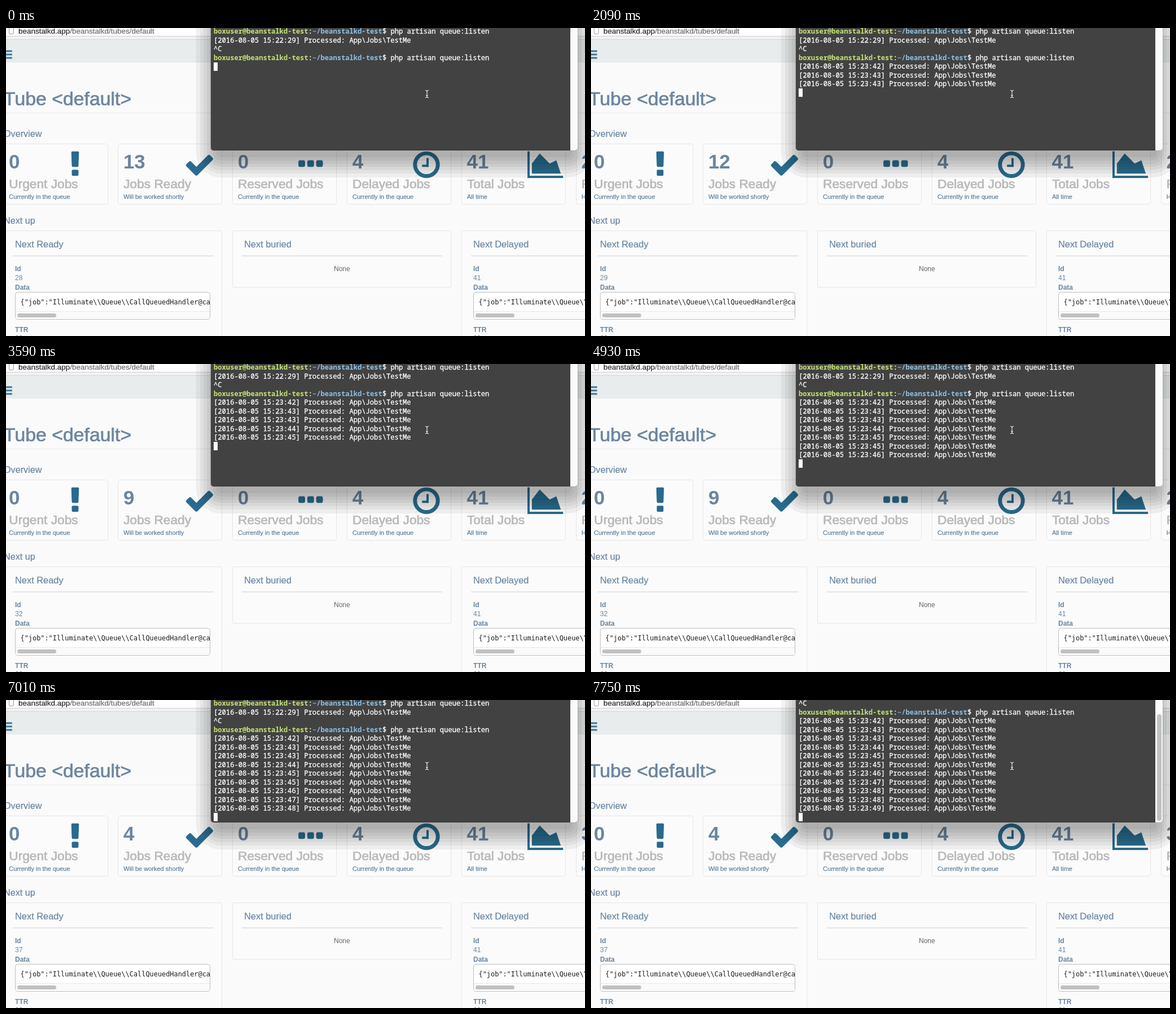
An HTML page with a canvas for the animation above (8000 ms loop, 1026 px wide and 546 px high).

```html
<!DOCTYPE html>
<html lang="en">
<head>
<meta charset="utf-8">
<title>Queue dashboard</title>
<style>
html, body { margin: 0; width: 100%; height: 100%; overflow: hidden; background: #fafafa; }
canvas { display: block; width: 1026px; height: 546px; }
</style>
</head>
<body>
<canvas id="stage" width="1026" height="546"></canvas>
<script>
const ctx = document.getElementById('stage').getContext('2d', { alpha: false });
const LOOP = 8000;
const SANS = '"Liberation Sans", Arial, sans-serif';
const CODE = '"DejaVu Sans Mono", monospace';
const TERM = '"Noto Sans Mono", "DejaVu Sans Mono", monospace';
const BLUE = '#6b859f', ICON = '#296b8e', EDGE = '#e6e6e6';

// Start time and clock second of each finished job
const jobs = [
  [590, 42], [1340, 43], [2090, 43], [2840, 44], [3590, 45], [4180, 45],
  [4930, 46], [5670, 47], [6420, 48], [7160, 48], [7750, 49]
];

// Dashboard polls: time, ready jobs, next id, last counter
const polls = [
  [0, 13, 28, 28], [1340, 12, 29, 29], [2990, 9, 32, 29],
  [5380, 6, 35, 31], [7010, 4, 37, 33]
];

function rect(x, y, w, h, color) {
  ctx.fillStyle = color;
  ctx.fillRect(x, y, w, h);
}

function box(x, y, w, h, r, fill, stroke) {
  ctx.beginPath();
  ctx.roundRect(x, y, w, h, r);
  if (fill) { ctx.fillStyle = fill; ctx.fill(); }
  if (stroke) { ctx.strokeStyle = stroke; ctx.lineWidth = 1; ctx.stroke(); }
}

// Polygon whose corners are rounded by growing it outwards by r
function poly(points, color, r = 0) {
  ctx.beginPath();
  points.forEach(([x, y]) => ctx.lineTo(x, y));
  ctx.closePath();
  ctx.fillStyle = color;
  ctx.fill();
  if (r) {
    ctx.strokeStyle = color;
    ctx.lineWidth = 2 * r;
    ctx.stroke();
  }
}

function text(s, x, y, font, color, weight = 0) {
  ctx.font = font;
  ctx.fillStyle = color;
  ctx.fillText(s, x, y);
  if (weight) {
    ctx.strokeStyle = color;
    ctx.lineWidth = weight;
    ctx.strokeText(s, x, y);
  }
}

const sans = (s, x, y, size, color = BLUE, weight = 0) =>
  text(s, x, y, `${size}px ${SANS}`, color, weight);
const bold = (s, x, y, size, color = BLUE) =>
  text(s, x, y, `bold ${size}px ${SANS}`, color);

function drawChrome() {
  rect(0, 0, 1026, 14, '#ffffff');
  rect(0, 14, 1026, 1, '#d0d0d0');
  rect(0, 15, 1026, 5, '#f2f2f2');
  rect(0, 20, 1026, 1, '#d5d5d5');
  rect(0, 21, 1026, 40, '#e9ecec');
  rect(0, 60, 1026, 1, '#e2e5e5');
  box(5.5, -3.5, 8, 14, 1, '#ffffff', '#9a9a9a');
  sans('beanstalkd.app', 22, 10, 13.46, '#202020', 0.15);
  const path = 22 + ctx.measureText('beanstalkd.app').width;
  sans('/beanstalkd/tubes/default', path, 10, 13.46, '#666666', 0.15);
  for (let i = 0; i < 3; i++) box(-4, 39.5 + i * 6, 15, 3, 1, '#3f7596');
}

// Icons are drawn on a grid of 1792 units
function icon(x, draw) {
  ctx.save();
  ctx.translate(x, 214.7);
  ctx.scale(0.0308, 0.0308);
  ctx.lineJoin = 'round';
  draw();
  ctx.restore();
}

function drawIcons() {
  icon(94.9, () => {
    poly([[740, 192], [1052, 192], [1025, 960], [767, 960]], ICON, 64);
    box(704, 1184, 384, 352, 64, ICON);
  });
  icon(315.3, () => {
    poly([[218, 928], [353, 793], [715, 1155], [1439, 431], [1574, 566], [715, 1425]], ICON, 97);
  });
  icon(512.2, () => {
    for (let i = 0; i < 3; i++) box(192 + i * 512, 640, 384, 384, 96, ICON);
  });
  icon(717.4, () => {
    ctx.beginPath();
    ctx.arc(896, 896, 656, 0, 7);
    ctx.strokeStyle = ICON;
    ctx.lineWidth = 224;
    ctx.stroke();
    box(896, 512, 128, 512, 32, ICON);
    box(640, 896, 384, 128, 32, ICON);
  });
  icon(924, () => {
    rect(0, 128, 128, 1536, ICON);
    rect(0, 1536, 2048, 128, ICON);
    poly([[256, 1408], [256, 832], [704, 256], [1280, 832], [1664, 640], [1920, 1408]], ICON);
  });
}

function drawCards(poll) {
  const cards = [
    [0, 'Urgent Jobs', 'Currently in the queue'],
    [poll[1], 'Jobs Ready', 'Will be worked shortly'],
    [0, 'Reserved Jobs', 'Currently in the queue'],
    [4, 'Delayed Jobs', 'Currently in the queue'],
    [41, 'Total Jobs', 'All time'],
    [poll[3], 'Reserves', 'Held so far']
  ];
  cards.forEach(([count, title, note], i) => {
    const x = -3.5 + i * 202.9;
    box(Math.round(x) - 0.5, 205.5, 184, 107, 4, '#fbfbfb', EDGE);
    bold(count, x + 8.5, 249, 35);
    sans(title, x + 8.8, 284, 22.7, '#b8b8b8', 0.7);
    sans(note, x + 8.8, 303, 11, '#5b7c98', 0.2);
  });
  drawIcons();
}

function drawPanel(x, title, height) {
  box(x - 0.5, 359.5, 387, height, 1, '#fbfbfb', EDGE);
  sans(title, x + 20, 389, 16.4, BLUE, 0.2);
  rect(x + 16, 403, 355, 2, '#e4e4e4');
}

function drawJob(x, title, id) {
  drawPanel(x, title, 240);
  const left = x + 20;
  bold('Id', left, 431, 12);
  sans(id, left, 447, 12);
  bold('Data', left, 464, 12);
  box(left + 0.5, 468.5, 345, 48, 4, '#ffffff', '#bdbdbd');
  rect(left + 1, 502, 344, 1, '#e8e8e8');
  rect(left + 1, 503, 344, 12, '#fafafa');
  box(left + 4, 506, 69, 7, 3.5, '#c1c1c1');
  ctx.save();
  ctx.beginPath();
  ctx.rect(left, 468, 345, 34);
  ctx.clip();
  text('{"job":"Illuminate\\\\Queue\\\\CallQueuedHandler@call","data":{}}',
    left + 9.5, 490, `11.9px ${CODE}`, '#1c1c1c');
  ctx.restore();
  bold('TTR', left, 539, 12);
  sans('60', left, 554, 12);
}

function drawPage(poll) {
  rect(0, 0, 1026, 546, '#fafafa');
  drawChrome();
  sans('Tube <default>', -4, 137, 33.8, BLUE, 0.7);
  rect(0, 150, 1026, 1, '#e9e9e9');
  sans('Overview', -4, 193, 16.2, BLUE, 0.2);
  drawCards(poll);
  sans('Next up', -4, 347, 16.2, BLUE, 0.2);
  drawJob(-4, 'Next Ready', poll[2]);
  drawPanel(402, 'Next buried', 100);
  sans('None', 581, 431, 12, '#666666');
  drawJob(808, 'Next Delayed', 41);
}

function drawShadow() {
  for (const s of [26, 19, 13, 7, 2, -4, -10]) {
    box(363 - s, -60, 650 + 2 * s, 299 + s, 18 + s, 'rgba(0,0,0,0.05)');
  }
}

function drawTerminal(t) {
  const done = jobs.filter(([start]) => t >= start);
  const prompt = { prompt: true };
  const stamp = (min, sec) => `[2016-08-05 15:${min}:${sec}] Processed: App\\Jobs\\TestMe`;
  const lines = [prompt, stamp(22, 29), '^C', prompt, ...done.map(job => stamp(23, job[1]))];
  const scroll = Math.max(0, lines.length - 13);
  const font = `12.15px ${TERM}`, cell = 7.29, pitch = 15.5;

  drawShadow();
  box(362.5, -10, 651, 227.5, 5, '#a0a0a0');
  ctx.save();
  ctx.beginPath();
  ctx.roundRect(363, -10, 650, 227, 5);
  ctx.clip();
  rect(363, 0, 637, 217, '#424242');
  rect(363, 216, 637, 1, '#303030');
  rect(1000, 0, 13, 217, '#fafafa');
  if (scroll) {
    const top = 215 - 217 * 217 / (217 + scroll * pitch);
    box(1003, top, 8, 214 - top, 4, '#c1c1c1');
  }
  lines.slice(scroll).forEach((line, i) => {
    const y = Math.round(10 + i * pitch);
    const put = (s, col, color = '#ffffff') => text(s, 368 + col * cell, y, font, color, 0.3);
    const strong = (s, col, color) => text(s, 368 + col * cell, y, 'bold ' + font, color);
    if (line.prompt) {
      strong('boxuser@beanstalkd-test', 0, '#c5e478');
      put(':', 23);
      strong('~/beanstalkd-test', 24, '#8fc1e3');
      put('$ php artisan queue:listen', 41);
    } else {
      put(line, 0);
    }
  });
  rect(368, Math.round(-1.5 + (lines.length - scroll) * pitch), 7, 15, '#ffffff');
  ctx.restore();
}

function drawPointer() {
  ctx.beginPath();
  for (const side of [-3, 3]) {
    ctx.moveTo(746 + side, 110.5);
    ctx.quadraticCurveTo(746, 110.5, 746, 113);
    ctx.lineTo(746, 121);
    ctx.quadraticCurveTo(746, 123.5, 746 + side, 123.5);
  }
  ctx.moveTo(744, 119.5);
  ctx.lineTo(748, 119.5);
  ctx.strokeStyle = '#f0f0f0';
  ctx.lineWidth = 1.1;
  ctx.stroke();
}

let origin;
function frame(now) {
  origin ??= now;
  const t = (now - origin) % LOOP;
  drawPage(polls.filter(([start]) => t >= start).pop());
  drawTerminal(t);
  drawPointer();
  requestAnimationFrame(frame);
}
requestAnimationFrame(frame);
</script>
</body>
</html>
```
